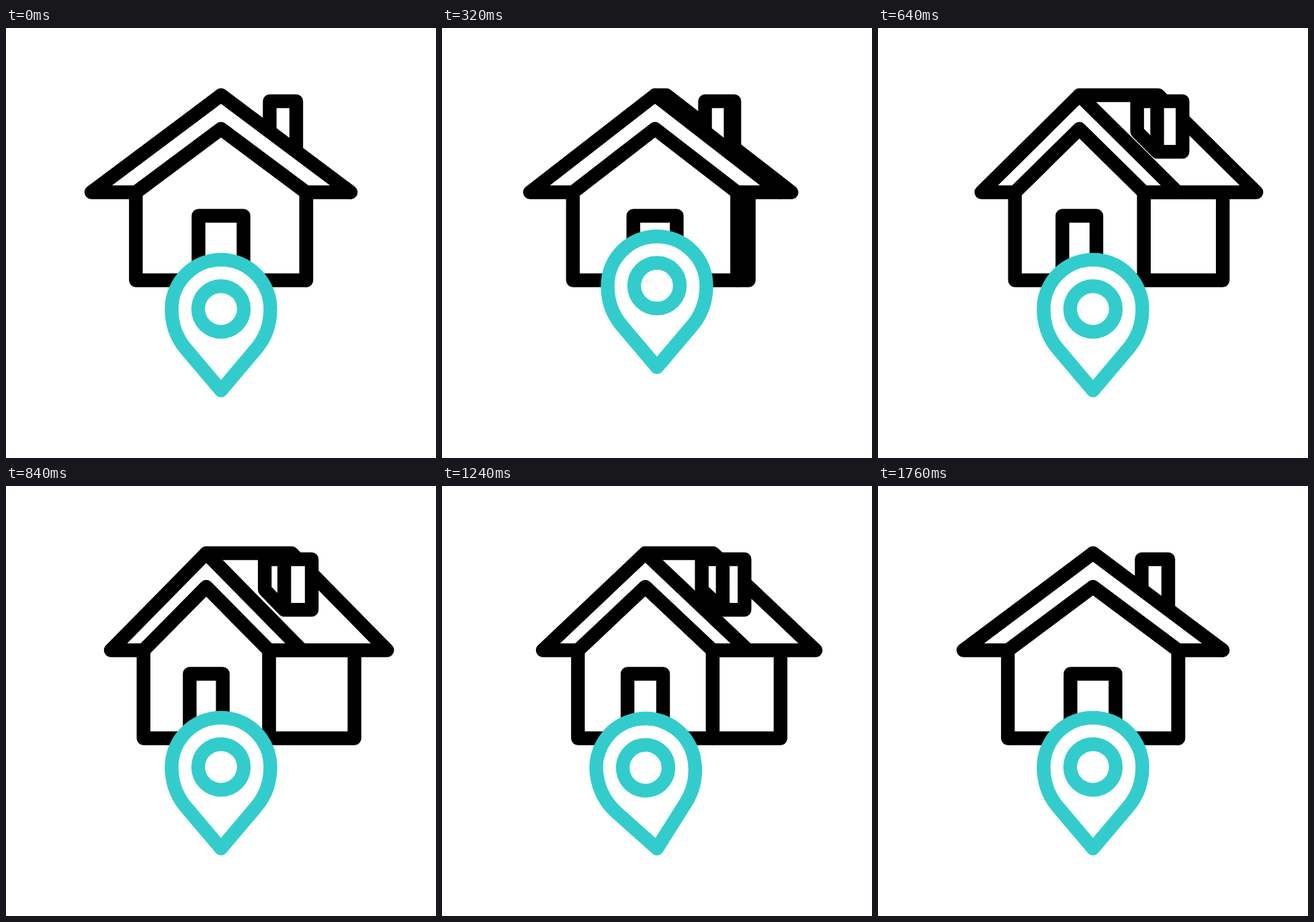
Recreate the animation shown at these times as an HTML page. Size 640x640 px, loop 1800 ms.

```html
<!DOCTYPE html>
<html lang="en">
<head>
<meta charset="utf-8">
<title>House and map pin</title>
<style>
  html, body { margin: 0; width: 100%; height: 100%; overflow: hidden; background: #fff; }
  svg { display: block; width: 100%; height: 100%; }
  path, circle { fill: #fff; stroke-width: 20.4; stroke-linejoin: round; stroke-linecap: round; }

  /* Each house part morphs between its frontal and its turned outline. */
  .house path { stroke: #000; d: var(--front); animation: turn 1800ms infinite; }
  .side {
    --front: path("M447 244.5 H447 V375.5 H447 Z");
    --turned: path("M391.3 244.5 H518.8 V375.5 H391.3 Z");
  }
  .slope {
    --front: path("M320 100 H320 L513 244.5 H513 Z");
    --turned: path("M298 100 H425.5 L567.5 244.5 H440 Z");
  }
  .chimney {
    --front: path("M392.5 109 H432 V184.3 H432 L392.5 154.3 Z M432 109 V184.3");
    --turned: path("M385.1 109 H455.1 V184.3 H414.1 L385.1 154.3 Z M414.1 109 V184.3");
  }
  .wall {
    --front: path("M193.3 244.5 L320 150 L446.7 244.5 V375.5 H193.3 Z");
    --turned: path("M204.7 244.5 L298 150 L391.3 244.5 V375.5 H204.7 Z");
  }
  .door {
    --front: path("M286.5 375.5 V279.5 H353.5 V375.5 Z");
    --turned: path("M273.4 375.5 V279.5 H322.6 V375.5 Z");
  }
  .gable {
    --front: path("M127 244.5 L320 100 L513 244.5 H446.7 L320 150 L193.3 244.5 Z");
    --turned: path("M156 244.5 L298 100 L440 244.5 H391.3 L298 150 L204.7 244.5 Z");
  }
  @keyframes turn {
    0%, 1.11% { d: var(--front); animation-timing-function: cubic-bezier(.74, 0, .26, 1); }
    49.44% { d: var(--turned); animation-timing-function: cubic-bezier(.7, 0, .3, 1); }
    99.72%, 100% { d: var(--front); }
  }

  .pin {
    stroke: #33cccc;
    transform-origin: 320px 540px;
    animation: bob 1800ms infinite, rock 1800ms infinite;
    animation-timing-function: cubic-bezier(.4, 0, .6, 1);
  }
  @keyframes bob {
    0%, 33.33%, 100% { translate: 0 0; }
    16.67% { translate: 0 -35px; }
  }
  @keyframes rock {
    0%, 52.78%, 94.44%, 100% { rotate: 0deg; }
    66.67% { rotate: -9.05deg; }
    80.56% { rotate: 9.05deg; }
  }
</style>
</head>
<body>
<svg viewBox="0 0 640 640">
  <g class="house">
    <path class="side"/>
    <path class="slope"/>
    <path class="chimney"/>
    <path class="wall"/>
    <path class="door"/>
    <path class="gable"/>
  </g>
  <g class="pin">
    <path d="M320 539.5 L267.7 477.7 C254.2 461.7 246.5 441 246.5 418.3 A73.5 73.5 0 0 1 393.5 418.3 C393.5 441 385.8 461.7 372.3 477.7 Z"/>
    <circle cx="320" cy="418.2" r="34"/>
  </g>
</svg>
</body>
</html>
```
